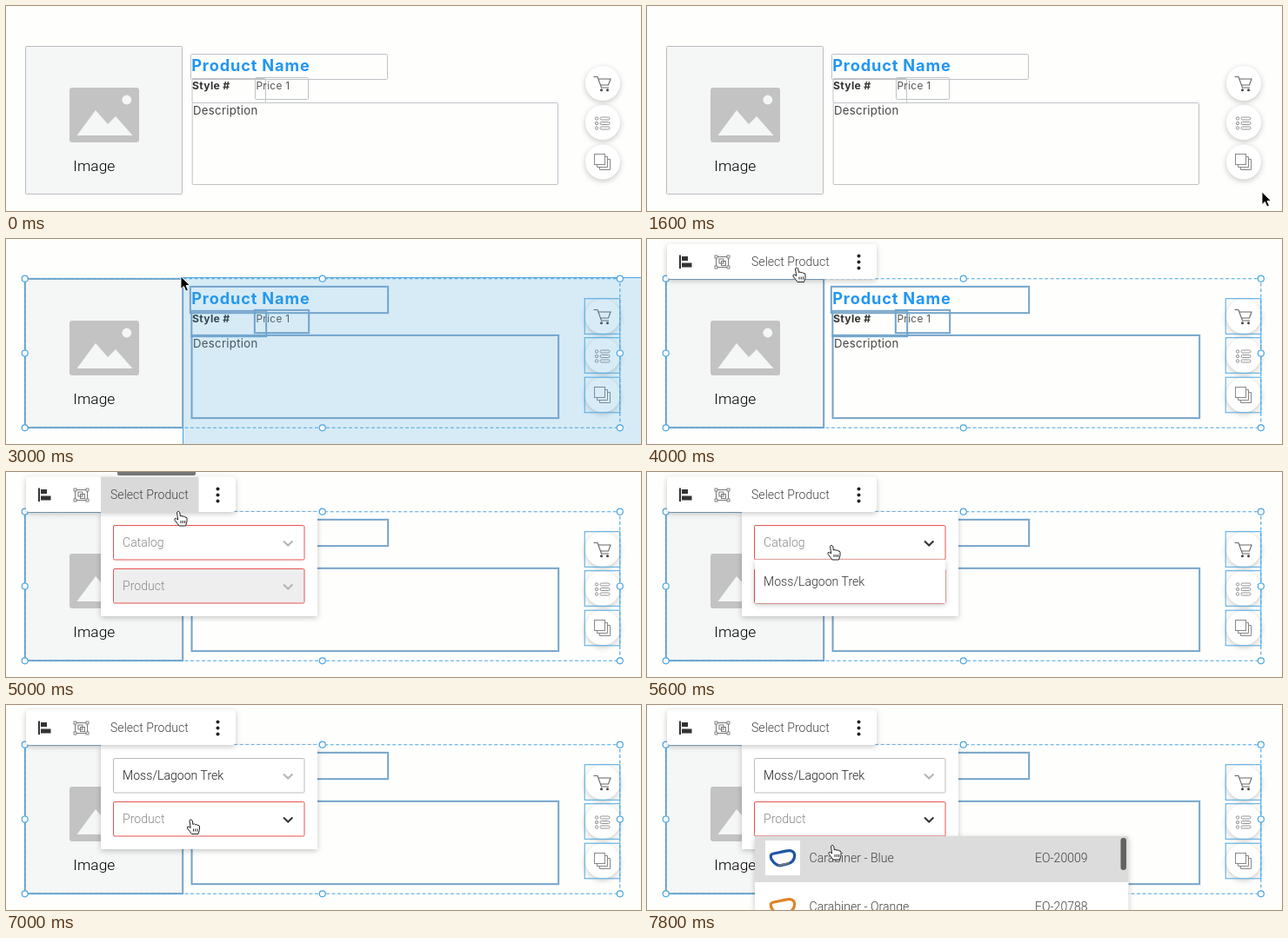
Animation, 730 px wide and 236 px high, one loop 8000 ms. Source, as an HTML page:

```html
<!DOCTYPE html>
<html lang="en">
<head>
<meta charset="utf-8">
<title>Product selection</title>
<style>
  html, body { margin: 0; width: 100%; height: 100%; overflow: hidden; background: #fefefd; }
  svg { display: block; width: 730px; height: 236px; }
  text { font-family: Roboto, sans-serif; font-size: 14.1px; font-weight: 300; white-space: pre; }
  .doc { font-family: Inter, sans-serif; font-weight: 400; letter-spacing: .3px; }
  .strong { font-weight: 700; }
  .title { letter-spacing: .85px; }
  .raised { filter: drop-shadow(0 2px 3px rgba(0, 0, 0, .22)); }
</style>
</head>
<body>
<svg id="stage" viewBox="0 0 730 236"></svg>
<script>
const LOOP = 8000, STEP = 200;
const BLUE = '#4aa5df', RED = '#e5534f', DARK = '#333', MUTED = '#b4b4b4', PANEL = '#f5f6f6';
const CATALOG = 'Moss/Lagoon Trek';
const stage = document.getElementById('stage');

// Pointer: time, x, y
const pointer = [
  [1000, 724, 176], [1200, 716, 196], [1400, 709, 210], [1600, 707, 214],
  [1800, 724, 231], [2000, 760, 250], [2200, 610, 166], [2400, 316, 75],
  [2600, 228, 51], [2800, 204, 44], [3000, 201, 43], [3200, 166, 41],
  [3400, 150, 41], [3800, 160, 36], [4200, 184, 29], [4600, 190, 29],
  [5000, 198, 45], [5400, 212, 80], [5600, 212, 84], [6000, 208, 121],
  [6400, 210, 117], [6800, 212, 129], [7200, 213, 134], [7800, 213, 161]
];
// Dragged corner of the marquee
const corner = [
  [2200, 640, 176], [2400, 348, 84], [2600, 236, 54],
  [2800, 205, 45], [3000, 203, 44], [3200, 172, 42]
];

// Selectable boxes: left, top, right, bottom
const image = [22.5, 46.5, 202.5, 216.5];
const fields = [
  [212.5, 55.5, 438.5, 84.5], [214, 83.5, 298.5, 111.5],
  [286.5, 82.5, 347.5, 107.5], [214.2, 111.5, 634.5, 205.5]
];
const buttons = [89, 134, 179.5].map(y => [666, y - 19.5, 705, y + 19.5]);
const boxes = [image, ...fields, ...buttons];

const grow = ([l, t, r, b], d) => [l - d, t - d, r + d, b + d];
const rect = (x, y, w, h, fill, extra = '') =>
  `<rect x="${x}" y="${y}" width="${w}" height="${h}" fill="${fill}" ${extra}/>`;
const frame = ([l, t, r, b], stroke, extra = '') =>
  rect(l, t, r - l, b - t, 'none', `stroke="${stroke}" ${extra}`);
const disc = (x, y, r, fill, extra = '') =>
  `<circle cx="${x}" cy="${y}" r="${r}" fill="${fill}" ${extra}/>`;
const line = (d, stroke, width = 1, fill = 'none') =>
  `<path d="${d}" fill="${fill}" stroke="${stroke}" stroke-width="${width}"/>`;
const label = (x, y, str, fill, extra = '') =>
  `<text x="${x}" y="${y}" fill="${fill}" ${extra}>${str}</text>`;
const doc = (x, y, str, size, fill, look = '') =>
  label(x, y, str, fill, `class="doc ${look}" style="font-size:${size}px"`);
const raised = body => `<g class="raised">${body}</g>`;

function at(keys, t) {
  const i = keys.findIndex(k => k[0] >= t);
  if (i < 1) return keys[i < 0 ? keys.length - 1 : 0].slice(1);
  const a = keys[i - 1], b = keys[i], p = (t - a[0]) / (b[0] - a[0]);
  return [a[1] + (b[1] - a[1]) * p, a[2] + (b[2] - a[2]) * p];
}

function page() {
  const [l, t, r, b] = image;
  const rows = [129.5, 135, 140.5].map(y =>
    disc(679, y, 1.7, 'none', 'stroke="#888" stroke-width=".9"') +
    rect(683, y - 1.5, 11, 3, 'none', 'rx="1.5" stroke="#888" stroke-width=".9"')).join('');
  return rect(l, t, r - l, b - t, PANEL, 'stroke="#bbbcbe" rx="1"') +
    rect(73, 94, 80, 63, '#c3c3c3', 'rx="3"') +
    disc(138.8, 108, 5.4, PANEL) +
    line('M81.5 149L103 120L117 136L126 127L145.5 149Z', 'none', 0, PANEL) +
    label(77.3, 190, 'Image', '#000', 'style="font-size:17.4px"') +
    fields.map(f => frame(f, '#bfc2c6', 'rx="1"')).join('') +
    doc(213.2, 74.8, 'Product Name', 18.2, '#2196f3', 'strong title') +
    doc(214, 95.6, 'Style #', 12.2, '#333', 'strong') +
    doc(287.5, 95.6, 'Price 1', 11.8, '#555') +
    doc(215, 125.2, 'Description', 13.2, '#444') +
    buttons.map(k => raised(disc(686, (k[1] + k[3]) / 2, 20, '#fff'))).join('') +
    line('M675.5 81.5H680L684.5 94H693M681 84H695L692.5 91H683.5', '#666', 1.1) +
    disc(684.5, 96.7, 1.5, '#444') + disc(691.5, 96.7, 1.5, '#444') + rows +
    rect(676.5, 170.5, 12, 12, 'none', 'stroke="#888"') +
    line('M689 173.5H691.5V185.5H679.5V183M692 176.5H694.5V188.5H682.5V186', '#888');
}

function selection(t) {
  if (t < 2200) return '';
  const dragging = t < 3400;
  const [cx, cy] = at(corner, t);
  const picked = boxes.map(k => grow(k, .8)).filter(k => k[2] > cx && k[3] > cy);
  const l = Math.min(...picked.map(k => k[0])), top = Math.min(...picked.map(k => k[1]));
  const r = Math.max(...picked.map(k => k[2])), b = Math.max(...picked.map(k => k[3]));
  const whole = [l, top, r, b];
  const xs = [l, (l + r) / 2, r], ys = [top, (top + b) / 2, b];
  let out = dragging
    ? rect(Math.round(cx) + .5, Math.round(cy) + .5, 800, 400, 'rgba(60,160,215,.2)', `stroke="${BLUE}"`) : '';
  out += picked.map(k => k[0] > 660
    ? frame(k, BLUE) : frame(k, '#6da4cf', 'stroke-width="1.7"')).join('');
  out += frame(whole, BLUE, 'stroke-dasharray="4 2.5" stroke-width="1.1"');
  for (const x of xs) for (const y of ys)
    if (x !== xs[1] || y !== ys[1]) out += disc(x, y, 3.5, '#fff', `stroke="${BLUE}" stroke-width="1.2"`);
  return out;
}

function input(y, str, ink, border, arrow, fill = '#fff') {
  return rect(123.5, y + .5, 219.5, 39.5, fill, `stroke="${border}" rx="1.5"`) +
    label(134, y + 25, str, ink) +
    line(`M319 ${y + 18.5}L324.2 ${y + 23.5}L329.4 ${y + 18.5}`, arrow, 2);
}

function toolbar(t) {
  if (t < 3600) return '';
  const hover = t >= 4200 && t <= 5000;
  const group = '#777';
  return (hover && t >= 4400 ? rect(128, -20, 90, 24, '#777', 'rx="2"') : '') +
    raised(rect(23, 5.5, 241, 40.5, '#fff', 'rx="4"') +
      (hover ? rect(109, 5.5, 112.5, 40.5, '#d9d9d9') : '')) +
    rect(37, 18.5, 2, 15.5, DARK) + rect(40, 20, 7, 5, DARK) + rect(40, 27.5, 11.5, 5, DARK) +
    frame([79.5, 20.5, 93.5, 32.5], group) +
    [79.5, 93.5].map(x => [20.5, 32.5].map(y =>
      rect(x - 1.5, y - 1.5, 3, 3, '#fff', `stroke="${group}" stroke-width=".9"`)).join('')).join('') +
    frame([83, 23, 88, 28], group) + frame([85.5, 25.5, 90.5, 30.5], group) +
    label(120, 31, 'Select Product', '#444') +
    [19.5, 26.5, 33.5].map(y => disc(243.5, y, 2, '#222')).join('');
}

function panel(t) {
  if (t < 4600) return '';
  const chosen = t >= 6200, open = t >= 5600 && !chosen, ready = t >= 6600, list = t >= 7200;
  const focus = chosen && t < 7000;
  return raised(rect(109, 46, 249, 120, '#fff')) +
    input(61, chosen ? CATALOG : 'Catalog', chosen ? '#222' : '#888',
      chosen ? (focus ? '#444' : '#bbb') : RED, open || focus ? DARK : MUTED) +
    input(111, 'Product', '#888', RED, t >= 7000 ? DARK : MUTED, ready ? '#fff' : '#eee') +
    (open ? raised(rect(124, 101, 219, 50, t >= 5800 ? '#dcdcdc' : '#fff')) +
      label(134, 131, CATALOG, '#333') : '') +
    (list ? products(t) : '');
}

function products(t) {
  const item = (y, name, code, color) =>
    rect(136, y + 5, 40, 40, '#fff') +
    `<g transform="rotate(-12 156 ${y + 25})">` +
    line(`M146 ${y + 18}H161Q171 ${y + 18} 170 ${y + 25}Q168 ${y + 33} 159 ${y + 33}H151Q146 ${y + 32} 143 ${y + 24}Q142 ${y + 18} 146 ${y + 18}Z`, color, 3.2) +
    line(`M149 ${y + 32.5}H162`, '#777', 2) + '</g>' +
    label(186.5, y + 30, name, '#444') + label(446, y + 30, code, '#444');
  return raised(rect(124, 151, 429.5, 110, '#fff')) +
    (t >= 7600 ? rect(124, 151, 429.5, 53, '#dcdcdc') : '') +
    item(151, 'Carabiner - Blue', 'EO-20009', '#1f55a5') +
    item(207, 'Carabiner - Orange', 'EO-20788', '#df8428') +
    rect(544.5, 153, 6.5, 37, '#626262', 'rx="3"');
}

function cursor(t) {
  if (t < 1000) return '';
  const [x, y] = at(pointer, t);
  const hand = (t >= 4000 && t < 6200) || t >= 6800;
  const shape = hand
    ? line('M-1.5 1.5Q0-1 1.7 1.5L2.4 6Q4.3 4.5 5 6.3Q7 5 7.6 7Q9.8 6.3 10 8.5V12L8.5 17H1L-4 10.5Q-4.6 8 -2.4 8.5L-.3 10ZM3 11V14M5.3 11V14M7.6 11V14', '#222', 1, '#fff')
    : line('M0 0V14.5L3.4 11.4L5.8 17L8.4 15.9L6 10.5H10.5Z', '#fff', .9, '#000');
  return `<g transform="translate(${x} ${y})">${shape}</g>`;
}

const base = page();
let shown = -1;
function draw() {
  const t = Math.floor(performance.now() % LOOP / STEP) * STEP;
  if (t !== shown) {
    shown = t;
    stage.innerHTML = base + selection(t) + panel(t) + toolbar(t) + cursor(t);
  }
  requestAnimationFrame(draw);
}
draw();
</script>
</body>
</html>
```
